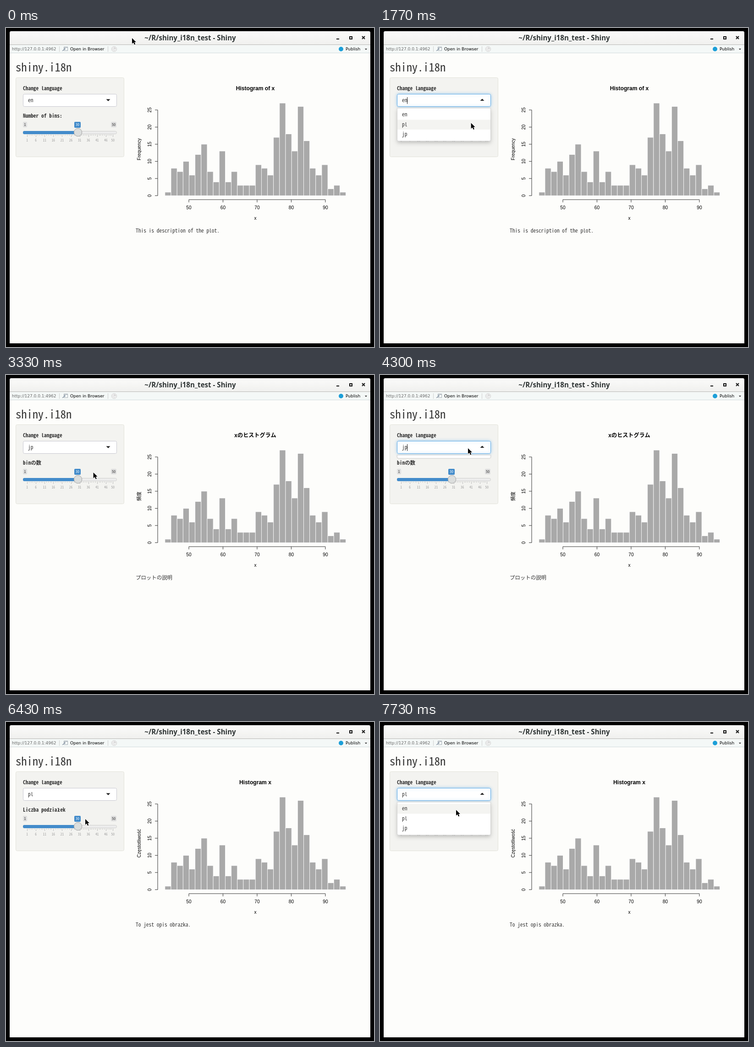
Write an HTML page with a canvas that moves like this. It is 803x697 px and loops after 8000 ms.

```html
<!DOCTYPE html>
<html lang="en">
<head>
<meta charset="utf-8">
<title>shiny.i18n</title>
<style>
html, body { margin: 0; width: 100%; height: 100%; overflow: hidden; background: #000; }
canvas { display: block; }
</style>
</head>
<body>
<canvas id="stage" width="803" height="697"></canvas>
<script>
const c = document.getElementById('stage').getContext('2d');
const LOOP = 8000;
const MONO = '"Noto Sans Mono CJK JP", "Noto Sans CJK JP", "Noto Sans Mono", monospace';
const SANS = '"Liberation Sans", "Noto Sans CJK JP", "Noto Sans CJK", sans-serif';
const UI = '"DejaVu Sans", sans-serif';
const BODY = '11.44px ' + MONO;

const WORDS = {
  en: { title: 'Histogram of x', axis: 'Frequency', bins: 'Number of bins:', about: 'This is description of the plot.' },
  jp: { title: 'xのヒストグラム', axis: '頻度', bins: 'binの数', about: 'プロットの説明' },
  pl: { title: 'Histogram x', axis: 'Częstotliwość', bins: 'Liczba podziałek', about: 'To jest opis obrazka.' }
};
const OPTIONS = ['en', 'pl', 'jp'];
const COUNTS = [1, 8, 7, 10, 6, 12, 15, 7, 4, 13, 4, 7, 3, 3, 3, 9, 8, 6, 17, 27, 18, 13, 26, 16, 8, 6, 9, 2, 3, 1];

// Pointer stops: time, x, y
const PATH = [
  [0, 275, 22], [30, 275, 22], [800, 215, 159], [1300, 215, 159], [2100, 189, 236],
  [3030, 189, 236], [3830, 194, 163], [3870, 194, 163], [4000, 192, 160], [4600, 192, 160],
  [5300, 173, 212], [6430, 173, 212], [7100, 170, 162], [7450, 170, 162], [7720, 166, 192], [LOOP, 166, 192]
];
// Each use of the select: focus, list shown, mouse down, list closed
const VISITS = [
  [970, 1040, 2500, 2560],
  [4200, 4270, 5730, 5790],
  [7300, 7370, 7730, LOOP]
];

function text(s, x, y, font, color = '#333', align = 'left') {
  c.font = font;
  c.fillStyle = color;
  c.textAlign = align;
  c.fillText(s, x, y);
}

function upright(s, x, y, font) {
  c.save();
  c.translate(x, y);
  c.rotate(-Math.PI / 2);
  text(s, 0, 0, font, '#000', 'center');
  c.restore();
}

function rect(x, y, w, h, color) {
  c.fillStyle = color;
  c.fillRect(x, y, w, h);
}

function panel(x, y, w, h, r, fill, stroke) {
  c.beginPath();
  c.roundRect(x, y, w, h, r);
  c.fillStyle = fill;
  c.fill();
  if (stroke) {
    c.strokeStyle = stroke;
    c.lineWidth = 1;
    c.stroke();
  }
}

function line(color, width, ...pts) {
  c.beginPath();
  for (let i = 0; i < pts.length; i += 2) c.lineTo(pts[i], pts[i + 1]);
  c.strokeStyle = color;
  c.lineWidth = width;
  c.stroke();
}

function poly(color, ...pts) {
  c.beginPath();
  for (let i = 0; i < pts.length; i += 2) c.lineTo(pts[i], pts[i + 1]);
  c.closePath();
  c.fillStyle = color;
  c.fill();
}

function disc(x, y, r, fill, stroke) {
  c.beginPath();
  c.arc(x, y, r, 0, 7);
  c.fillStyle = fill;
  c.fill();
  if (stroke) {
    c.strokeStyle = stroke;
    c.lineWidth = 1;
    c.stroke();
  }
}

function shadow(color, blur, dy = 0) {
  c.shadowColor = color;
  c.shadowBlur = blur;
  c.shadowOffsetY = dy;
}

function drawWindow() {
  rect(0, 0, 803, 697, '#000');
  panel(8, 7, 787, 682, [4, 4, 0, 0], '#fdfdfb');
  const bar = c.createLinearGradient(0, 7, 0, 36);
  bar.addColorStop(0, '#fbfbfa');
  bar.addColorStop(1, '#f0f0ee');
  panel(8, 7, 787, 29, [4, 4, 0, 0], bar);
  rect(8, 36, 787, 1, '#b9b9b6');
  rect(8, 37, 787, 17, '#f4f8f7');
  rect(8, 54, 787, 1, '#d3dbdd');
  text('~/R/shiny_i18n_test - Shiny', 402, 27, 'bold 15.1px "Open Sans", "Noto Sans", sans-serif', '#2e3434', 'center');

  rect(721, 23, 6, 2, '#111');
  c.strokeStyle = '#111';
  c.lineWidth = 2;
  c.strokeRect(750, 19, 5, 5);
  line('#111', 2, 777, 18, 783, 24);
  line('#111', 2, 783, 18, 777, 24);

  text('http://127.0.0.1:4962', 13, 49, '9px ' + UI, '#666');
  rect(116, 40, 1, 12, '#cfcfcf');
  rect(222, 40, 1, 12, '#cfcfcf');
  c.lineWidth = 1;
  c.strokeStyle = '#a9b1b8';
  c.strokeRect(126.5, 41.5, 8, 8);
  rect(126, 41, 9, 2, '#a9b1b8');
  line('#8795a5', 1.5, 123, 50, 128, 46);
  poly('#8795a5', 126, 44, 130, 44.5, 128.5, 48);
  text('Open in Browser', 140, 49, '9px ' + UI, '#000');
  disc(236, 46, 5.5, '#f6f6f6', '#ccc');
  c.beginPath();
  c.arc(236, 46, 2.7, 0.3, 5.2);
  c.stroke();
  poly('#c4c4c4', 236.5, 42, 240, 45, 236.5, 46);
  disc(731, 46, 5, '#1c9fd8');
  text('Publish', 741, 49, '9px ' + UI, '#000');
  poly('#333', 783, 45, 788, 45, 785.5, 48);
}

function drawSlider(label) {
  text(label, 37, 196, 'bold ' + BODY);
  const small = '8.1px ' + MONO;
  panel(37, 205, 9, 12, 2, '#dedede');
  panel(229, 205, 12, 12, 2, '#dedede');
  panel(149, 205, 14, 13, 2, '#428bca');
  text('1', 41.5, 214, small, '#333', 'center');
  text('50', 235, 214, small, '#333', 'center');
  text('30', 156, 214, small, '#fff', 'center');
  panel(37.5, 225.5, 204, 6, 3, '#ececec', '#cfcfcf');
  panel(37, 225, 120, 7, [3, 0, 0, 3], '#428bca');
  for (let v = 1; v <= 50; v++) {
    const x = 46 + (v - 1) * 3.82;
    const major = v % 5 === 1 || v === 50;
    rect(Math.round(x), 233, 1, major ? 5 : 2, '#bbb');
    if (major) text(v, x, 248, '7.3px ' + MONO, '#999', 'center');
  }
  disc(157, 228, 8.7, '#dcdedd', '#a5a5a5');
}

function drawPlot(words) {
  const px = v => 399 + (v - 50) * 7.4475;
  const py = n => 366.3 - n * 7.49;
  const font = '10.2px ' + SANS;
  const bin = 53 / 30;
  COUNTS.forEach((n, i) => {
    const x = px(43 + i * bin);
    rect(x, py(n), bin * 7.4475, n * 7.49, '#a9a9a9');
    c.strokeStyle = '#fff';
    c.lineWidth = 0.8;
    c.strokeRect(x, py(n), bin * 7.4475, n * 7.49);
  });
  line('#333', 1, px(50), 375, px(90), 375);
  for (let v = 50; v <= 90; v += 10) {
    line('#333', 1, px(v), 375, px(v), 381);
    text(v, px(v), 396, font, '#000', 'center');
  }
  line('#333', 1, 331, py(0), 331, py(25));
  for (let n = 0; n <= 25; n += 5) {
    line('#333', 1, 325, py(n), 331, py(n));
    upright(n, 317, py(n), font);
  }
  text(words.title, 544, 136, 'bold 12.1px ' + SANS, '#000', 'center');
  text('x', 544, 419, font, '#000', 'center');
  upright(words.axis, 294, 265, font);
  text(words.about, 283, 447, BODY);
}

function drawSelect(value, focus, caret) {
  text('Change language', 37, 136, 'bold ' + BODY);
  if (focus) shadow('rgba(102,175,233,.6)', 6);
  panel(37.5, 144.5, 204, 27, 3, '#fff', focus ? '#66afe9' : '#c8c8d0');
  shadow('transparent', 0);
  text(value, 48, 162, BODY);
  if (caret) rect(59, 151, 1, 15, '#222');
  if (focus) poly('#222', 218.5, 159, 227.5, 159, 223, 154.5);
  else poly('#222', 218.5, 155.5, 227.5, 155.5, 223, 160);
}

function drawList(active, partial) {
  const h = partial ? 7 : 72;
  shadow('rgba(0,0,0,.22)', partial ? 2 : 8, partial ? 0 : 4);
  panel(37.5, 175, 204, h, [0, 0, 3, 3], '#fff');
  shadow('transparent', 0);
  panel(37.5, 175, 204, h, [0, 0, 3, 3], '#fff', '#d4d4d4');
  if (partial) return;
  rect(38, 179 + active * 21.4, 203, 21.4, '#f4f4f1');
  OPTIONS.forEach((s, i) => text(s, 48, 193 + i * 21.5, BODY));
}

function pointerAt(t) {
  const i = PATH.findIndex(p => p[0] > t);
  const [t0, x0, y0] = PATH[i - 1];
  const [t1, x1, y1] = PATH[i];
  const u = (t - t0) / (t1 - t0);
  const k = u * u * (3 - 2 * u);
  return [x0 + (x1 - x0) * k, y0 + (y1 - y0) * k];
}

function drawPointer(x, y) {
  c.save();
  c.translate(x, y);
  c.lineJoin = 'round';
  c.beginPath();
  for (const [a, b] of [[0, 0], [0, 12.5], [3, 9.8], [5.2, 14.5], [7.3, 13.5], [5.2, 9], [9, 9]]) c.lineTo(a, b);
  c.closePath();
  c.strokeStyle = '#fff';
  c.lineWidth = 1.6;
  c.stroke();
  c.fillStyle = '#000';
  c.fill();
  c.restore();
}

const langAt = (t, first, second) => t < first ? 'en' : t < second ? 'jp' : 'pl';

function draw(t) {
  const [x, y] = pointerAt(t);
  const value = langAt(t, 2560, 5790);
  const words = WORDS[langAt(t, 2640, 5890)];
  const visit = VISITS.find(v => t >= v[0] && t < v[3]);

  drawWindow();
  text('shiny.i18n', 21, 95, '24.43px ' + MONO);
  panel(21.5, 108.5, 236, 173, 3, '#f3f3f0', '#e2e2da');
  drawSlider(words.bins);
  drawPlot(words);
  drawSelect(value, !!visit, visit && t < visit[2]);
  if (visit && t >= visit[1]) {
    const row = y < 179 ? OPTIONS.indexOf(value) : Math.min(2, Math.floor((y - 179) / 21.4));
    drawList(row, t < visit[1] + 60);
  }
  drawPointer(x, y);
}

let start;
function tick(now) {
  start ??= now;
  draw((now - start) % LOOP);
  requestAnimationFrame(tick);
}
requestAnimationFrame(tick);
</script>
</body>
</html>
```
